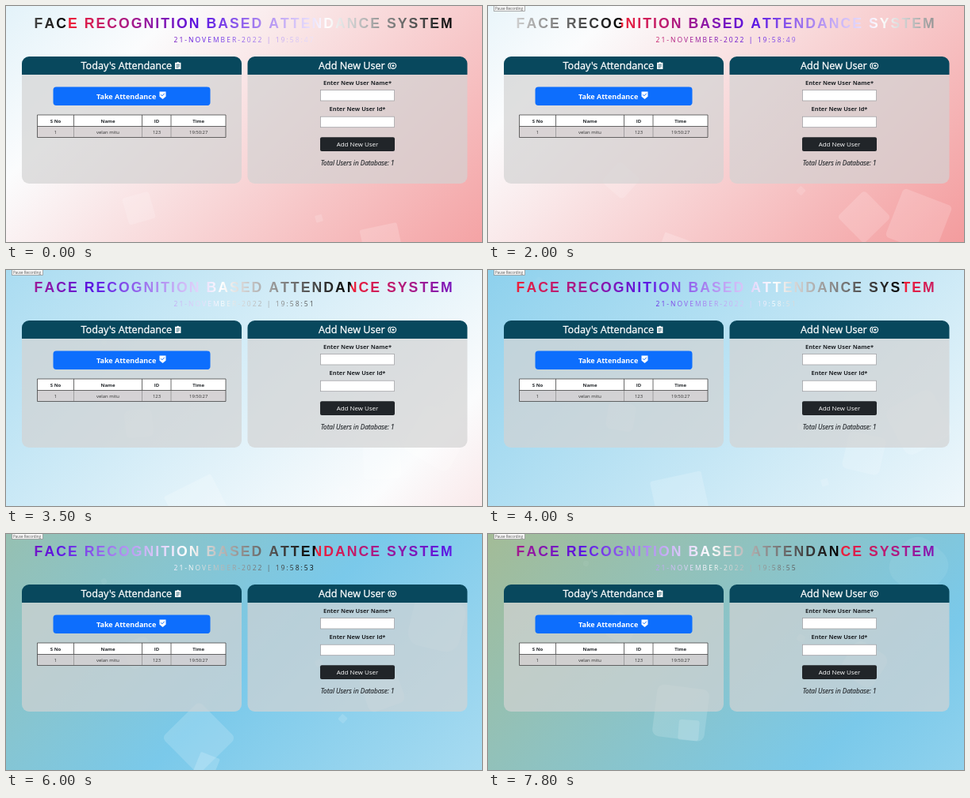
An HTML page with a canvas for the animation above (7900 ms loop, 600x299 px).

```html
<!DOCTYPE html>
<html lang="en">
<head>
<meta charset="utf-8">
<title>Attendance</title>
<style>
  html, body { margin: 0; width: 100%; height: 100%; overflow: hidden; }
  canvas, svg { position: absolute; left: 0; top: 0; width: 600px; height: 299px; }
  text { font-family: "Open Sans", "Noto Sans", sans-serif; fill: #212529; white-space: pre; }
  .mid { text-anchor: middle; }
  .title { font: bold 17.6px "Liberation Sans", Arial, sans-serif; letter-spacing: 2.06px; font-kerning: none; fill: url(#ink); }
  .date { font-size: 8.5px; letter-spacing: 2.03px; fill: url(#ink); }
  .head { font-size: 12.65px; fill: #fff; stroke: #fff; stroke-width: .3; }
  .take { font-size: 9px; font-weight: 700; fill: #fff; }
  .th { font-size: 6px; font-weight: 700; }
  .td { font-size: 5.9px; fill: #333; }
  .label { font-size: 7.45px; font-weight: 700; }
  .add { font-size: 7.95px; fill: #fff; }
  .total { font-size: 8.15px; font-style: italic; stroke: #212529; stroke-width: .15; }
  .tip { font-size: 4.5px; fill: #555; }
  .body { fill: rgba(211, 211, 211, .7); }
  .bar { fill: #08485d; }
  .field { fill: #fff; stroke: #9a9a9e; stroke-width: .7; }
  .line { fill: none; stroke: #fff; stroke-width: 1.1; }
</style>
</head>
<body>
<canvas id="stage" width="600" height="299"></canvas>
<svg viewBox="0 0 600 299">
  <defs>
    <linearGradient id="ink" gradientUnits="userSpaceOnUse" spreadMethod="repeat" y1="0" y2="0">
      <stop offset="0" stop-color="#ee2038"/>
      <stop offset=".333" stop-color="#5a14e2"/>
      <stop offset=".667" stop-color="#fff"/>
      <stop offset="1" stop-color="#000"/>
    </linearGradient>
    <path id="top" d="M0 23V9a9 9 0 0 1 9-9H268a9 9 0 0 1 9 9V23z"/>
    <path id="base" d="M0 23H277V152a9 9 0 0 1-9 9H9a9 9 0 0 1-9-9z"/>
  </defs>

  <text class="title" x="35.6" y="28">FACE RECOGNITION BASED ATTENDANCE SYSTEM</text>
  <text class="date" id="date" x="211.5" y="46"></text>

  <!-- Attendance card -->
  <g transform="translate(20 64)">
    <use href="#base" class="body"/><use href="#top" class="bar"/>
  </g>
  <text class="head" x="94.5" y="80">Today's Attendance</text>
  <path fill="#fff" d="M213 71.8h2.3a1.5 1.5 0 0 1 2.8 0h2.3v8.2h-7.4z"/>
  <path stroke="#08485d" stroke-width=".8" d="M214.5 74.2h4.4M214.5 76.1h4.4M214.5 78h3"/>
  <rect x="59.5" y="102.5" width="198" height="23.5" rx="4" fill="#0d6efd"/>
  <text class="take" x="114" y="118">Take Attendance</text>
  <path fill="#fff" d="M193.5 108.5h8v6.2l-4 3.4-4-3.4z"/>
  <path fill="none" stroke="#0d6efd" d="M195.2 112.3l1.6 1.6 3-3.2"/>

  <rect x="39.5" y="138" width="237.5" height="14.5" fill="#fff"/>
  <rect x="39.5" y="152.5" width="237.5" height="14" fill="#d8d0d2" fill-opacity=".7"/>
  <path stroke="#8a8a8c" stroke-width=".7" d="M85.5 152V166M171.5 152V166M208 152V166"/>
  <path fill="none" stroke="#444" stroke-width=".8" d="M39.5 138H277V166.5H39.5zM39.5 152.5H277M85.5 138V152M171.5 138V152M208 138V152"/>
  <g class="mid">
    <text class="th" x="62.5" y="147.8">S No</text>
    <text class="th" x="128.5" y="147.8">Name</text>
    <text class="th" x="190" y="147.8">ID</text>
    <text class="th" x="242.7" y="147.8">Time</text>
    <text class="td" x="62.5" y="161.8">1</text>
    <text class="td" x="128.5" y="161.8">velan mitu</text>
    <text class="td" x="190" y="161.8">123</text>
    <text class="td" x="242.7" y="161.8">19:50:27</text>
  </g>

  <!-- New user card -->
  <g transform="translate(304.5 64)">
    <use href="#base" class="body"/><use href="#top" class="bar"/>
  </g>
  <text class="head" x="394" y="80">Add New User</text>
  <circle class="line" cx="488" cy="75.8" r="3.6"/>
  <path class="line" d="M488 74v3.6M486.2 75.8h3.6M484.6 72a4 4 0 0 0 0 7.6"/>
  <g class="mid">
    <text class="label" x="443" y="99.8">Enter New User Name*</text>
    <text class="label" x="443" y="133.3">Enter New User Id*</text>
  </g>
  <rect class="field" x="396.5" y="106.5" width="93" height="13.5"/>
  <rect class="field" x="396.5" y="140.2" width="93" height="13.5"/>
  <rect x="396" y="166.3" width="94" height="17.7" rx="2" fill="#212529"/>
  <text class="add mid" x="443" y="178">Add New User</text>
  <text class="total mid" x="443" y="202">Total Users in Database: 1</text>

  <g id="tip">
    <rect x="7.5" y="-1" width="39" height="7.5" fill="#f6f6f6" stroke="#8c8c8c" stroke-width=".7"/>
    <text class="tip" x="9" y="4.6">Pause Recording</text>
  </g>
</svg>
<script>
const W = 600, H = 299, LOOP = 7900, STEP = 100;
const ctx = document.getElementById("stage").getContext("2d");
const ink = document.getElementById("ink");
const date = document.getElementById("date");
const tip = document.getElementById("tip");

// left edge, size, birth (s), lifetime (s)
const squares = [
  [150, 35, -5.7, 25], [60, 9, -5.7, 12], [420, 9, -1.7, 25],
  [240, 26, 3.2, 18], [390, 9, -5.7, 25], [450, 48, -2.7, 25],
  [210, 66, 1.3, 25], [300, 11, 4.3, 45], [120, 7, -18.7, 35],
  [510, 66, .3, 11]
];

// cubic-bezier(.25, .1, .25, 1)
function ease(x) {
  let lo = 0, hi = 1;
  for (let i = 0; i < 24; i++) {
    const s = (lo + hi) / 2, r = 1 - s;
    if (.75 * s * r * r + .75 * s * s * r + s ** 3 < x) lo = s; else hi = s;
  }
  const r = 1 - lo;
  return .3 * lo * r * r + 3 * lo * lo * r + lo ** 3;
}

// A 400% wide diagonal gradient slides past the stage, there and back in 15 s.
function backdrop(t) {
  const turn = 1.87, half = 7.5;
  const p = t < turn ? ease((t - turn + half) / half) : 1 - ease((t - turn) / half);
  const from = -(1800 * p + 448) / 2, to = from + 3596 / 2;
  const g = ctx.createLinearGradient(from, from, to, to);
  ["#c0b25c", "#7ac9ea", "#fbfcfd", "#ef5f61"].forEach((c, i) => g.addColorStop(i / 3, c));
  ctx.fillStyle = g;
  ctx.fillRect(0, 0, W, H);
}

function drawSquare([left, size, birth, life], t) {
  const k = (((t - birth) % life + life) % life) / life;
  ctx.save();
  ctx.translate(left + size / 2, 374 - size / 2 - 440 * k);
  ctx.rotate(4 * Math.PI * k);
  ctx.fillStyle = `rgba(255,255,255,${.2 * (1 - k)})`;
  ctx.beginPath();
  ctx.roundRect(-size / 2, -size / 2, size, size, size * k / 2);
  ctx.fill();
  ctx.restore();
}

// The lettering's gradient drifts right and turns back at both ends.
function slideInk(t) {
  const first = .75, last = 7.05;
  const u = t < first ? 2 * first - t : t > last ? 2 * last - t : t;
  const x = 168 + 178 * (u - 2);
  ink.setAttribute("x1", x);
  ink.setAttribute("x2", x + 490);
}

function draw(now) {
  const t = Math.floor(now % LOOP / STEP) * STEP / 1000;
  backdrop(t);
  squares.forEach(s => drawSquare(s, t));
  slideInk(t);
  date.textContent = "21-NOVEMBER-2022 | 19:58:" + (48 + Math.floor(t - .5));
  tip.style.display = t < .5 ? "none" : "";
}

const start = performance.now();
function tick() {
  draw(performance.now() - start);
  requestAnimationFrame(tick);
}
tick();
</script>
</body>
</html>
```
